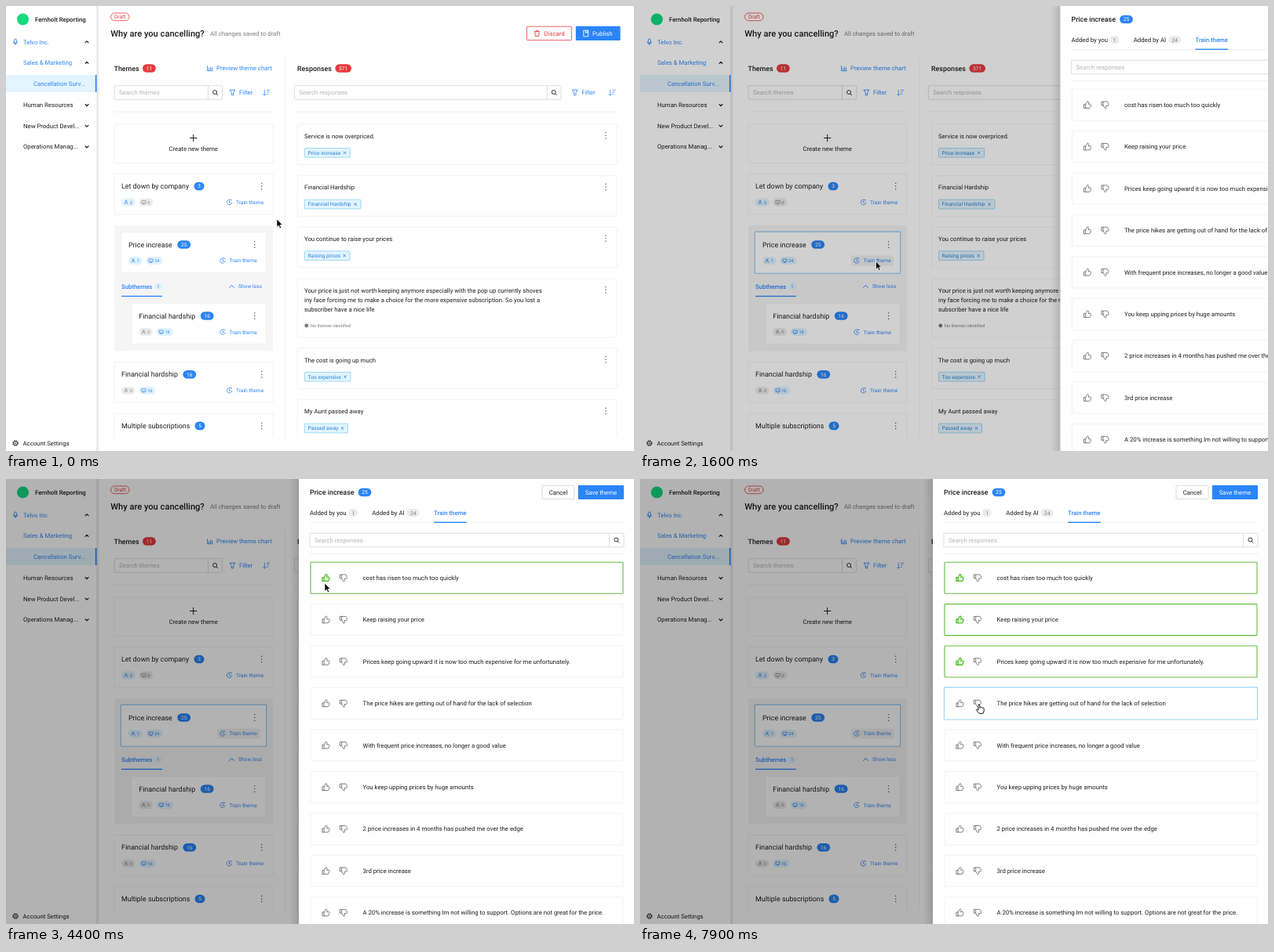
Recreate the animation shown at these times as an HTML page. Size 800 by 568 pixels, loop 8000 ms.

```html
<!DOCTYPE html>
<html lang="en">
<head>
<meta charset="utf-8">
<title>Theme training</title>
<style>
  html, body { margin: 0; width: 100%; height: 100%; overflow: hidden; background: #fff; }
  svg { display: block; width: 800px; height: 568px; }
  text { font-family: Roboto, Arial, sans-serif; text-rendering: geometricPrecision; white-space: pre; }
</style>
</head>
<body>
<svg id="stage" viewBox="0 0 800 568" fill="none"></svg>
<script>
const BLUE = '#2b85f8', INK = '#1c1c1e', RED = '#e53b3e', GREEN = '#52bd2b', EDGE = '#efeff0', GREY = '#7b7b80';
// Type sizes: 10, 12, 14, 16 and 20 px at 5/9 scale
const XS = 5.56, S = 6.67, M = 7.78, L = 8.89, XL = 11.11;

// Text is placed by the middle of its capitals
const text = (x, y, str, size = M, fill = INK, more = '') =>
  `<text x="${x}" y="${y + size * .355}" font-size="${size}" fill="${fill}" ${more}>${str}</text>`;
const MID = 'text-anchor="middle"', BOLD = 'font-weight="500"';
const box = (x, y, x2, y2, fill, stroke = 'none', r = 0, more = '') =>
  `<rect x="${x}" y="${y}" width="${x2 - x}" height="${y2 - y}" rx="${r}" fill="${fill}" stroke="${stroke}" stroke-width=".8" ${more}/>`;
const line = (d, stroke, w = .9, more = '') =>
  `<path d="${d}" stroke="${stroke}" stroke-width="${w}" ${more}/>`;
const icon = (x, y, d, stroke = BLUE, w = .9) =>
  line(d, stroke, w, `transform="translate(${x} ${y})" stroke-linejoin="round"`);
const card = (x, y, x2, y2, more = '') => box(x, y, x2, y2, '#fff', EDGE, .8, more);

const ICON = {
  up: 'M-2.3 1.2L0-1.1 2.3 1.2',
  down: 'M-2.3-1.1L0 1.2 2.3-1.1',
  glass: 'M2.1-.5a2.5 2.5 0 1 1-5 0a2.5 2.5 0 1 1 5 0M1.4 1.4L3.5 3.5',
  funnel: 'M-3.5-3.3h7L1.2-.1V3.3h-2.4V-.1Z',
  sort: 'M-2.2-3.7V3.6M-4 1.8l1.8 1.9L-.4 1.8M.6-3.2h4M.6-.6h2.8M.6 2h1.6',
  chart: 'M-3.4-3.2V3.2H3.6M-1.4 2.3V-.2M.6 2.3V-2M2.6 2.3V-1',
  plus: 'M-4.6 0h9.2M0-4.6v9.2',
  mic: 'M-1.4-2.5a1.4 1.4 0 0 1 2.8 0V0a1.4 1.4 0 0 1-2.8 0ZM-2.6-.3a2.6 2.6 0 0 0 5.2 0M0 2.3V3.8',
  trash: 'M-3.6-2.3h7.2M-1.3-2.4v-1.2h2.6v1.2M-2.7-2.2L-2.3 3.6h4.6L2.7-2.2',
  doc: 'M-3-3.8h6v7.6h-6ZM-.3-3.8V-.5L1-1.4l1.1.9V-3.8',
  train: 'M2.2-2.4A3.2 3.2 0 1 0 3.2.3M0-1.8V.3h1.8M1.5-3.2l1.8.4M3.2-1.5h.2',
  user: 'M-1.1-1.2a1.1 1.1 0 1 0 2.2 0a1.1 1.1 0 1 0-2.2 0M-2.1 2.4a2.1 2.1 0 0 1 4.2 0',
  screen: 'M-2.6-2h5.2v3.2h-5.2ZM-1.2 2.3h2.4M0 1.2v1',
  thumb: 'M-4.6-.6h2.2v4.8h-2.2ZM-2.4-.5L-.1-4.5c1.5-.2 1.9 1 1.6 2L1.1-1h2.3c1 0 1.4.8 1.1 1.7L3.5 3.4c-.2.5-.5.8-1 .8H-2.4'
};

const pill = (cx, cy, n, fill = BLUE, size = S) => {
  const h = String(n).length * 1.9 + 4.6;
  return box(cx - h, cy - 5.3, cx + h, cy + 5.3, fill, 'none', 5.3) + text(cx, cy, n, size, '#fff', MID);
};
const count = (x, y, kind, n) => {
  const off = n === 0, w = n > 9 ? 21 : 17.5, col = off ? '#85858a' : BLUE;
  return box(x, y - 5, x + w, y + 5, off ? '#ebebec' : '#dff2fd', 'none', 5) +
    icon(x + 6, y, ICON[kind], col, .7) + text(x + 10.7, y, n, XS, col);
};
const dots = (x, y) => [-3.7, 0, 3.7].map(d => `<circle cx="${x}" cy="${y + d}" r=".75" fill="#55555a"/>`).join('');
const train = (x, y) => icon(x, y, ICON.train, BLUE, .8) + text(x + 8.5, y, 'Train theme', S, BLUE);
const search = (x, x2, y, cut, hint) =>
  box(x, y - 8.8, x2, y + 8.8, '#fff', '#d6d6d8', 1) + line(`M${cut} ${y - 8.8}v17.6`, '#d6d6d8', .8) +
  text(x + 6, y, hint, M, '#b4b4b8') + icon((cut + x2) / 2, y, ICON.glass, INK);
const filter = (x, sortX) => icon(x, 110.5, ICON.funnel) + text(x + 8.5, 110.5, 'Filter', M, BLUE) +
  icon(sortX, 110.5, ICON.sort, BLUE, .8);

function themeCard(x, x2, y, title, n, badgeX, people, ai, id = '') {
  return card(x, y, x2, y + 51.7, id) + text(x + 9, y + 15.7, title, L) + pill(badgeX, y + 15.7, n) +
    dots(x2 - 14.3, y + 15.7) + count(x + 9, y + 36.3, 'user', people) +
    count(x + (people ? 31.5 : 31.5), y + 36.3, 'screen', ai);
}

function sidebar() {
  const item = (x, y, str, col, arrow) => text(x, y, str, M, col) + (arrow ? icon(103, y, ICON[arrow], INK, 1.2) : '');
  return box(0, 0, 115.5, 568, '#fff') + box(115.5, 0, 119.5, 568, 'url(#side)') +
    '<circle cx="21.5" cy="17" r="7.6" fill="#14d980"/>' +
    text(37, 17, 'Fernholt Reporting', M, INK, BOLD) +
    icon(12, 46, ICON.mic) + item(22, 46, 'Telvo Inc.', BLUE, 'up') +
    item(22, 72.5, 'Sales &amp; Marketing', BLUE, 'up') +
    box(0, 88, 115.5, 110, '#e4f4fe') + box(113.8, 88, 115.5, 110, BLUE) +
    item(35, 99, 'Cancellation Surv...', BLUE) +
    item(22, 126.3, 'Human Resources', INK, 'down') +
    item(22, 153, 'New Product Devel...', INK, 'down') +
    item(22, 179.6, 'Operations Manag...', INK, 'down') +
    '<circle cx="12" cy="558" r="3.1" stroke="#333" stroke-width="1.3" stroke-dasharray="1.5 .93"/>' +
    '<circle cx="12" cy="558" r="2.6" stroke="#333" stroke-width=".8"/><circle cx="12" cy="558" r="1" stroke="#333" stroke-width=".7"/>' +
    item(21.5, 558, 'Account Settings', INK);
}

function header() {
  return box(133.5, 9, 157, 18.7, '#fff', RED, 4.8) + text(138, 13.9, 'Draft', S, RED) +
    text(133.3, 35, 'Why are you cancelling?', XL, INK, BOLD) +
    text(260, 35, 'All changes saved to draft', M, GREY) +
    box(663.4, 26.2, 720.6, 43.6, '#fff', RED, 1) + icon(676.5, 35, ICON.trash, RED) + text(685.5, 35, 'Discard', M, RED) +
    box(725.8, 25.8, 782.6, 44, BLUE, 'none', 1) + icon(738.8, 35, ICON.doc, '#fff') + text(747, 35, 'Publish', M, '#fff');
}

function themes() {
  return text(137.5, 79.5, 'Themes', L, INK, BOLD) + pill(182.4, 79.5, 11, RED) +
    icon(260, 79.5, ICON.chart) + text(268, 79.5, 'Preview theme chart', M, BLUE) +
    search(138, 275.5, 110.5, 257.5, 'Search themes') + filter(288.5, 331.5) +
    line('M138 135H340M367 135H778', EDGE) + line('M355.5 66V552', EDGE, .8) +
    '<g clip-path="url(#list)">' +
    card(138, 151, 340, 200.5) + icon(238.7, 168.5, ICON.plus, INK, 1) + text(238.7, 182.5, 'Create new theme', M, INK, MID) +
    themeCard(138, 340, 214.3, 'Let down by company', 3, 246, 3, 0) + train(284.5, 250.5) +
    box(138, 280, 340, 440.5, '#f5f5f6') +
    themeCard(147, 331, 288.8, 'Price increase', 25, 226.7, 1, 24, 'id="picked"') +
    box(269, 318.5, 323.5, 331.5, '#f0f0f1', 'none', 1, 'id="button"') + train(276, 325) +
    text(147, 358, 'Subthemes', M, BLUE, BOLD) + box(189, 353, 198.5, 363, '#dff2fd', 'none', 4.7) +
    text(193.7, 358, 1, XS, BLUE, MID) + box(147, 369.8, 199, 371.1, BLUE) +
    icon(287.5, 358, 'M-3.2 1.7L0-1.6 3.2 1.7', BLUE, 1) + text(296, 358, 'Show less', S, BLUE) +
    themeCard(160.3, 331, 379.8, 'Financial hardship', 16, 256.2, 0, 16) + train(276, 416.2) +
    themeCard(138, 340, 454.5, 'Financial hardship', 16, 233.8, 0, 16) + train(284.5, 490.8) +
    themeCard(138, 340, 520.2, 'Multiple subscriptions', 5, 247, 1, 4) + '</g>';
}

function responses() {
  const entry = (y, str, tag, end) => card(371.5, y, 778, y + 51.5) + text(380, y + 15, str) + dots(764, y + 14.3) +
    box(380.4, y + 30.5, end, y + 42.2, '#e2f4fe', '#8fd0f7', .8) + text(384.5, y + 36.4, tag, S, '#2583d8') +
    icon(end - 6.9, y + 36.4, 'M-1.7-1.7l3.4 3.4M1.7-1.7l-3.4 3.4', '#2583d8', .8);
  const long = ['Your price is just not worth keeping anymore especially with the pop up currently shoves',
    'iny face forcing me to make a choice for the more expensive subscription. So you lost a',
    'subscriber have a nice life'];
  return text(371, 79.5, 'Responses', L, INK, BOLD) + pill(429.7, 79.5, 571, RED) +
    search(367.4, 707, 110.5, 689.3, 'Search responses') + filter(724.7, 772) +
    '<g clip-path="url(#list)">' +
    entry(151, 'Service is now overpriced.', 'Price increase', 438.5) +
    entry(216.7, 'Financial Hardship', 'Financial Hardship', 452) +
    entry(282.3, 'You continue to raise your prices', 'Raising prices', 438) +
    card(371.5, 348, 778, 423) + long.map((s, i) => text(380, 362.8 + i * 12.4, s)).join('') + dots(764, 362.3) +
    '<circle cx="382.8" cy="408" r="2.4" fill="#77777b"/>' + text(388, 408, 'No themes identified', XS, GREY) +
    entry(436.9, 'The cost is going up much', 'Too expensive', 439) +
    entry(502.6, 'My Aunt passed away', 'Passed away', 435.5) + '</g>';
}

const ROWS = ['cost has risen too much too quickly', 'Keep raising your price',
  'Prices keep going upward it is now too much expensive for me unfortunately.',
  'The price hikes are getting out of hand for the lack of selection',
  'With frequent price increases, no longer a good value', 'You keep upping prices by huge amounts',
  '2 price increases in 4 months has pushed me over the edge', '3rd price increase',
  'A 20% increase is something Im not willing to support. Options are not great for the price.'];
const rowY = i => 126.2 + i * 53.42;

function drawer() {
  const tally = (cx, n, r) => box(cx - r, 38, cx + r, 48.3, '#ececed', 'none', 5) + text(cx, 43.2, n, S, GREY, MID);
  const row = (str, i) => {
    const y = rowY(i);
    return card(388, y - 20, 786, y + 20, 'class="row"') +
      `<g transform="translate(407.5 ${y})"><path class="like" d="${ICON.thumb}" stroke-linejoin="round"/></g>` +
      `<path d="${ICON.thumb}" transform="translate(430 ${y}) scale(1 -1)" stroke="#66666b" stroke-width=".85" stroke-linejoin="round"/>` +
      text(454.5, y, str);
  };
  return box(361, 0, 373, 568, 'url(#drop)') + box(373, 0, 800, 568, '#fff') +
    text(387, 17, 'Price increase', L, INK, BOLD) + pill(457, 17, 25) +
    box(683, 8.3, 724, 25.6, '#fff', '#d2d2d4', 1) + text(703.5, 17, 'Cancel', M, INK, MID) +
    box(728.8, 8, 787, 25.9, BLUE, 'none', 1) + text(757.9, 17, 'Save theme', M, '#fff', MID) +
    text(387, 43.3, 'Added by you') + tally(442, 1, 6) + text(466.3, 43.3, 'Added by AI') + tally(518.7, 24, 8) +
    text(545, 43.3, 'Train theme', M, BLUE, BOLD) + line('M387 55.7H787M387 95.5H787', EDGE) +
    box(545, 54.6, 586.7, 56, BLUE) + search(387, 787, 78, 768.6, 'Search responses') + ROWS.map(row).join('');
}

const fade = (id, from, to) => `<linearGradient id="${id}"><stop stop-opacity="${from}"/><stop offset="1" stop-opacity="${to}"/></linearGradient>`;
const stage = document.getElementById('stage');
stage.innerHTML =
  `<defs>${fade('side', .13, 0)}${fade('drop', 0, .13)}<clipPath id="list"><path d="M130 140H800V551H130Z"/></clipPath></defs>` +
  header() + themes() + responses() + sidebar() +
  '<rect id="mask" width="800" height="568" fill="#000"/>' +
  `<g id="drawer">${drawer()}</g>` +
  '<g id="cursor"><path id="arrow" d="M0 0V10.2L2.4 8.1 4 11.8 5.7 11 4.1 7.4H7.2Z" fill="#000" stroke="#fff" stroke-width=".7"/>' +
  '<path id="hand" d="M-1.3 1a1 1 0 0 1 2 0V4l.2-.6a.9.9 0 0 1 1.7.4.9.9 0 0 1 1.7.4.9.9 0 0 1 1.6.7V7.6L4.8 11H-.3L-3.6 6.8c-.7-1.1.6-1.7 1.3-1L-1.3 6.7Z" fill="#fff" stroke="#000" stroke-width=".9" stroke-linejoin="round"/></g>';

const $ = id => document.getElementById(id);
const rows = [...document.querySelectorAll('.row')], likes = [...document.querySelectorAll('.like')];
const set = (el, attrs) => { for (const k in attrs) el.setAttribute(k, attrs[k]); };
const show = (el, on) => set(el, { visibility: on ? 'visible' : 'hidden' });

const LOOP = 8000, TICK = 100, OPEN = 1472, SLIDE = 300, SHADE = .3;
const LIKED = [4200, 5400, 7000];
const PATH = [[0, 345, 272], [500, 345, 272], [1200, 300.5, 326], [1900, 300.5, 326], [2700, 576, 161],
  [2900, 576, 161], [3800, 406.5, 131], [4200, 406, 133], [4600, 406, 133], [5200, 408, 182],
  [5700, 408, 182], [6400, 408, 234], [7100, 408, 234], [7600, 432.3, 288.3], [LOOP, 432.3, 288.3]];

function pointer(t) {
  const k = PATH.findIndex(p => p[0] > t), [t0, x0, y0] = PATH[k - 1], [t1, x1, y1] = PATH[k];
  const u = (t - t0) / (t1 - t0), e = u * u * (3 - 2 * u);
  return [x0 + (x1 - x0) * e, y0 + (y1 - y0) * e];
}

// cubic-bezier(.7, .3, .1, 1), solved by bisection
function slide(x) {
  if (x <= 0 || x >= 1) return x <= 0 ? 0 : 1;
  const curve = (s, a, b) => 3 * (1 - s) * (1 - s) * s * a + 3 * (1 - s) * s * s * b + s ** 3;
  let lo = 0, hi = 1;
  for (let n = 0; n < 24; n++) {
    const mid = (lo + hi) / 2;
    if (curve(mid, .7, .1) < x) lo = mid; else hi = mid;
  }
  return curve(lo, .3, 1);
}

function outline(el, x, y, w, h, grow, stroke, width) {
  set(el, { x: x - grow, y: y - grow, width: w + 2 * grow, height: h + 2 * grow, stroke, 'stroke-width': width });
}

function draw(t) {
  const [x, y] = pointer(t), p = slide((t - OPEN) / SLIDE);
  set($('drawer'), { transform: `translate(${427 * (1 - p)} 0)` });
  show($('drawer'), p > 0);
  set($('mask'), { opacity: SHADE * p });

  // Hover under the drawer stays as it was when the drawer opened
  const [hx, hy] = pointer(Math.min(t, OPEN));
  const over = hx < 331 && hy > 289;
  outline($('picked'), 147, 288.8, 184, 51.7, over ? .7 : 0, over ? '#8cc8f2' : EDGE, over ? 1.1 : .8);
  show($('button'), hx < 323.5 && hy > 318.5);

  let hand = false;
  rows.forEach((el, i) => {
    const cy = rowY(i), liked = t >= LIKED[i];
    const hover = p === 1 && x > 388 && Math.abs(y - cy) < 20.3;
    if (hover && !liked && (Math.abs(x - 407.5) < 6 || Math.abs(x - 430) < 6) && Math.abs(y - cy) < 7) hand = true;
    outline(el, 388, cy - 20, 398, 40, hover && !liked ? .6 : 0,
      liked ? '#65bd43' : hover ? '#9bd3f3' : EDGE, liked || hover ? 1.1 : .8);
    set(likes[i], { stroke: liked ? GREEN : '#66666b', 'stroke-width': liked ? 1.3 : .85, fill: liked ? '#e9f8df' : 'none' });
  });
  set($('cursor'), { transform: `translate(${x} ${y})` });
  show($('hand'), hand);
  show($('arrow'), !hand);
}

function loop() {
  draw(Math.floor(performance.now() % LOOP / TICK) * TICK);
  requestAnimationFrame(loop);
}
loop();
</script>
</body>
</html>
```
